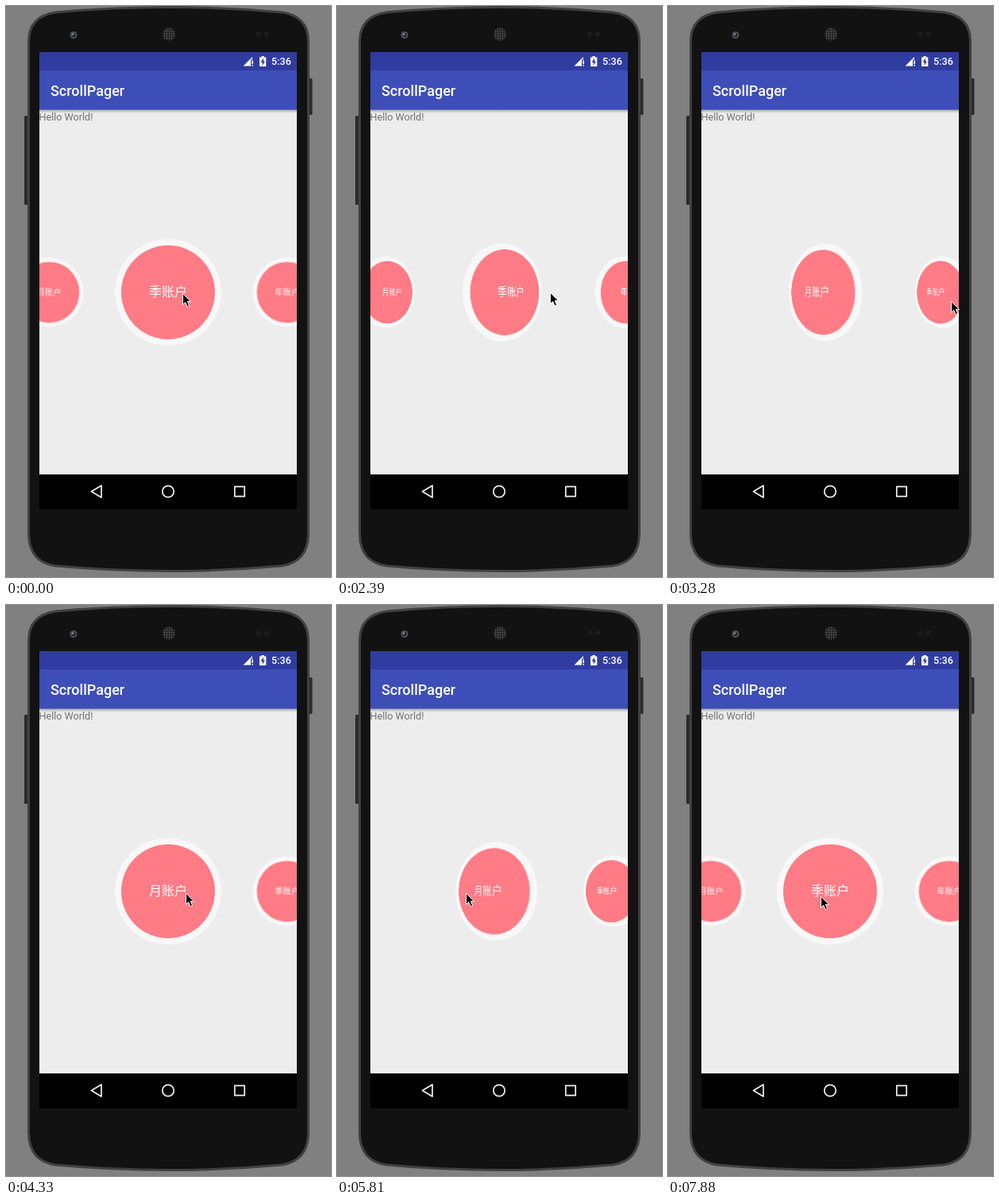
Animation of 409x718 px, one loop 8 s. Source, as an HTML page:

```html
<!DOCTYPE html>
<html lang="zh">
<head>
<meta charset="utf-8">
<title>ScrollPager</title>
<style>
html, body { margin: 0; width: 100%; height: 100%; overflow: hidden; background: #808080; }
svg { position: absolute; left: 0; top: 0; font-family: Roboto, sans-serif; }
#pager { position: absolute; left: 42px; top: 280px; width: 324px; height: 160px; overflow: hidden; }
.disc {
  position: absolute; left: 103px; top: 21px; width: 118px; height: 118px;
  border-radius: 50%; background: #ff7b85; box-shadow: 0 0 0 8px #f8f8f8;
  color: #fff; font: 16px/118px Roboto, "Noto Sans CJK SC", "Noto Sans CJK", sans-serif;
  text-align: center;
}
.disc span { display: block; white-space: nowrap; }
</style>
</head>
<body>
<svg width="409" height="718" viewBox="0 0 409 718">
  <defs>
    <linearGradient id="shade" x2="0" y2="1">
      <stop offset="0" stop-opacity=".3"/>
      <stop offset="1" stop-opacity="0"/>
    </linearGradient>
    <pattern id="mesh" width="3" height="3" patternUnits="userSpaceOnUse">
      <rect width="3" height="3" fill="#1c1c1c"/>
      <circle cx="1.5" cy="1.5" r="1" fill="#5c5c5c"/>
    </pattern>
  </defs>
  <rect width="409" height="718" fill="#808080"/>
  <rect x="23" y="138" width="6" height="112" rx="1.5" fill="#2b2b2b"/>
  <rect x="380" y="91" width="5.5" height="46" rx="1.5" fill="#2b2b2b"/>
  <path d="M28.500 44Q29 13 62 8Q205-5 348 8Q380 13 380.500 44V664Q380 699 347 704Q205 717 62 704Q29 699 28.500 664Z"
    fill="#121212" stroke="#414141" stroke-width="3"/>
  <circle cx="85" cy="36.500" r="4.500" fill="#50545a"/>
  <circle cx="85" cy="36.500" r="2.700" fill="#23272f"/>
  <circle cx="84" cy="35.500" r="1.300" fill="#8d97a8"/>
  <circle cx="205" cy="35.500" r="8" fill="url(#mesh)"/>
  <circle cx="318" cy="35" r="3" fill="#1d1d1d"/>
  <circle cx="328" cy="35" r="3" fill="#1d1d1d"/>

  <rect x="42" y="58" width="324" height="575" fill="#ededed"/>
  <rect x="42" y="130" width="324" height="5" fill="url(#shade)"/>
  <rect x="42" y="58" width="324" height="23" fill="#303c9f"/>
  <rect x="42" y="81" width="324" height="49.500" fill="#3d4eb8"/>
  <path d="M298.500 75.500L310 64V67.500H308V75.500Z" fill="#fff"/>
  <path d="M309.300 68.500H311V73H309.300ZM309.300 74H311V75.600H309.300Z" fill="#fff"/>
  <path d="M319 64.500H321.500V63H324.800V64.500H327.300V76H319Z" fill="#fff"/>
  <path d="M324 65.500L320.500 70.800H322.700V74.800L326 69.500H324Z" fill="#303c9f"/>
  <text x="334" y="74" font-size="12.600" font-weight="500" fill="#fff">5:36</text>
  <text x="56" y="112.500" font-size="18" font-weight="500" fill="#fff">ScrollPager</text>
  <text x="41.500" y="144" font-size="12.600" fill="#717171">Hello World!</text>

  <rect x="42" y="589" width="324" height="44" fill="#000"/>
  <g fill="none" stroke="#f2f2f2" stroke-width="1.700" stroke-linejoin="round">
    <path d="M107.500 610.500L120 603V618Z"/>
    <circle cx="204" cy="610.500" r="7.200"/>
    <rect x="287.800" y="604.300" width="12.400" height="12.400"/>
  </g>
</svg>
<div id="pager"></div>
<svg width="409" height="718" viewBox="0 0 409 718">
  <path id="cursor" d="M.5 .5V14.500L3.700 11.600L6 17L8.600 15.900L6.300 10.600H10.500Z"
    fill="#000" stroke="#fff" stroke-width="1"/>
</svg>
<script>
const LOOP = 8000, GAP = 150, DEPTH = 173;
const RELEASE_A = 3130, RELEASE_B = 7000, SETTLE = 770;

const shortTicks = [6, 20, 37, 38, 45, 50, 52];
const ticks = [0];
for (let i = 0; i < 53; i++) ticks.push(ticks[i] + (shortTicks.includes(i) ? 140 : 150));

// Pointer path: time, x, y
const path = [
  [0, 222, 361], [150, 221, 362], [450, 221, 362], [600, 220, 361], [750, 219, 361],
  [900, 219, 361], [1940, 255, 360], [2390, 268, 360], [3130, 349, 369], [3280, 356, 371],
  [3430, 350, 370], [4180, 221, 363], [4330, 226, 362], [4480, 226, 362], [5810, 162, 362],
  [6850, 97, 364], [7000, 89, 365], [7150, 92, 365], [7880, 192, 366], [8000, 192, 366]
];

const pager = document.getElementById('pager');
const cursor = document.getElementById('cursor');
const pages = [['月账户', '6.5%'], ['季账户', '10%'], ['年账户', '12%']].map(([front, back]) => {
  const disc = document.createElement('div');
  const label = document.createElement('span');
  disc.className = 'disc';
  disc.append(label);
  pager.append(disc);
  return { disc, label, front, back };
});

function pointer(t) {
  const i = path.findIndex(k => k[0] > t);
  const [t0, x0, y0] = path[i - 1], [t1, x1, y1] = path[i];
  const f = (t - t0) / (t1 - t0);
  return [x0 + (x1 - x0) * f, y0 + (y1 - y0) * f];
}

const remaining = f => Math.pow(1 - Math.min(1, f), 5);

// Pixels the row is moved right, 0 with the middle page centred.
function scroll(t, x) {
  if (t < RELEASE_A) return Math.max(0, x - 252);
  if (t < 4600) return GAP - 53 * remaining((t - RELEASE_A) / SETTLE);
  if (t < RELEASE_B) return GAP - Math.max(0, 177 - x);
  return 62 * remaining((t - RELEASE_B) / SETTLE);
}

function draw(t) {
  const [x, y] = pointer(t);
  const shift = scroll(t, x);
  cursor.setAttribute('transform', `translate(${x} ${y})`);
  pages.forEach(({ disc, label, front, back }, i) => {
    const pos = i - 1 + shift / GAP;
    const turn = pos - Math.round(pos);
    const scale = Math.max(0.65, 1 - Math.abs(pos));
    const flipped = Math.abs(turn) > 0.25;
    disc.style.transform =
      `translateX(${pos * GAP}px) scale(${scale}) perspective(${DEPTH}px) rotateY(${turn * 360}deg)`;
    label.textContent = flipped ? back : front;
    label.style.transform = flipped ? 'scaleX(-1)' : 'none';
  });
}

function frame() {
  const t = performance.now() % LOOP;
  draw(ticks.findLast(k => k <= t));
  requestAnimationFrame(frame);
}
frame();
</script>
</body>
</html>
```
